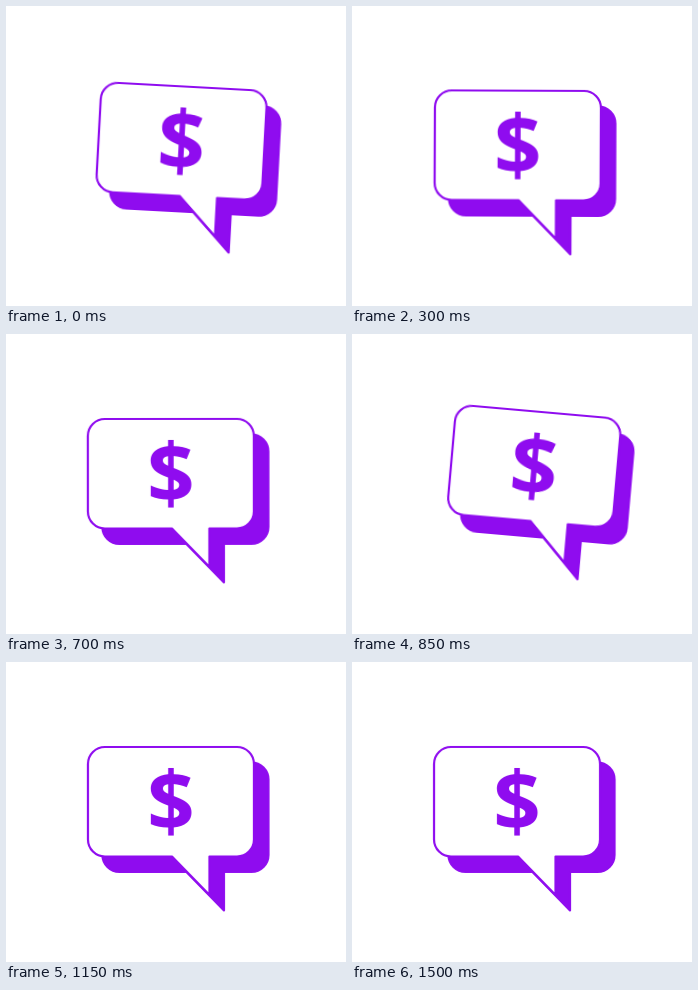
Write an HTML page that moves like this. It is 340x300 px and loops after 1.55 s.

```html
<!DOCTYPE html>
<html lang="en">
<head>
<meta charset="utf-8">
<title>Wobbling price bubble</title>
<style>
  html, body {
    margin: 0;
    width: 100%;
    height: 100%;
    overflow: hidden;
    background: #fff;
  }
  svg {
    display: block;
    width: 340px;
    height: 300px;
  }
  .bubble {
    --ink: #8f0cef;
    --out: cubic-bezier(.333, .667, .667, 1);
    --back: cubic-bezier(.333, 0, .667, 0);
    transform-origin: 165px 140px;
    animation: wobble 775ms -400ms infinite;
  }
  .shade, .face {
    stroke: var(--ink);
    stroke-width: 2.2;
    stroke-linejoin: round;
  }
  .shade { fill: var(--ink); }
  .face { fill: #fff; }
  text {
    fill: var(--ink);
    font: 700 83px "Open Sans", "Noto Sans", sans-serif;
    text-anchor: middle;
  }
  /* A quick throw to each side, then a slower start back to the centre. */
  @keyframes wobble {
    0%, 45.16%, 100% {
      transform: translate(0, 0) rotate(0deg);
      animation-timing-function: var(--out);
    }
    18.71% {
      transform: translate(-17.3px, -6.2px) rotate(-4.8deg);
      animation-timing-function: var(--back);
    }
    63.87% {
      transform: translate(17.4px, -7.5px) rotate(5.1deg);
      animation-timing-function: var(--back);
    }
  }
</style>
</head>
<body>
<svg viewBox="0 0 340 300">
  <defs>
    <path id="shape" d="M99 85H231a17 17 0 0 1 17 17V177.500a17 17 0 0 1-17 17H203.500V233L166 194.500H99a17 17 0 0 1-17-17V102a17 17 0 0 1 17-17Z"/>
  </defs>
  <g class="bubble">
    <use class="shade" href="#shape" x="14.500" y="15.500"/>
    <use class="face" href="#shape"/>
    <text x="165" y="169">$</text>
  </g>
</svg>
</body>
</html>
```
